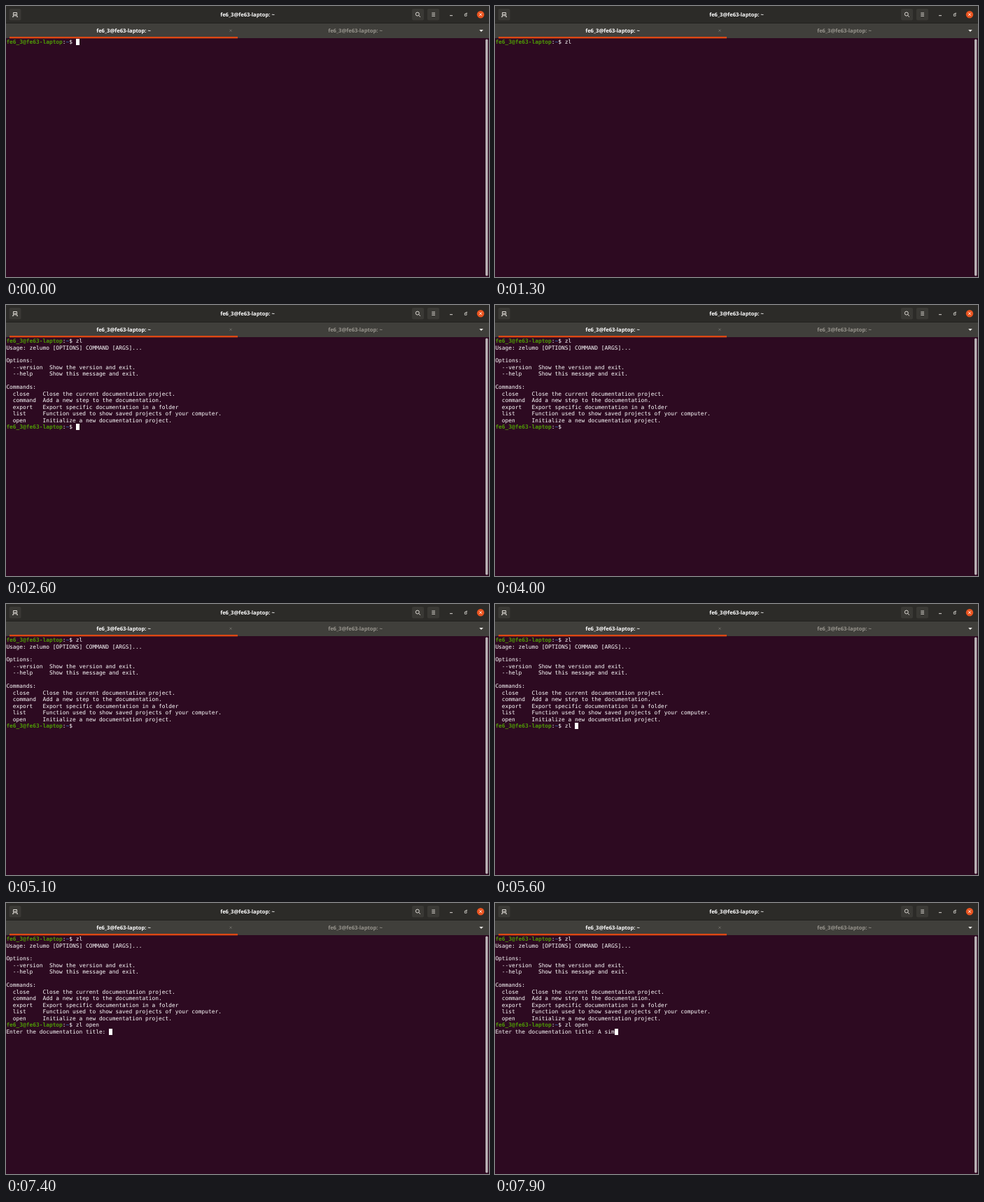
An HTML page that plays this animation: 690 by 388 pixels, repeating every 8 s.

```html
<!DOCTYPE html>
<html lang="en">
<head>
<meta charset="utf-8">
<title>Terminal</title>
<style>
  html, body { margin: 0; width: 100%; height: 100%; overflow: hidden; background: #2d0a21; }
  .stage {
    --w: 4.735px; --h: 9.46px;
    position: relative; width: 690px; height: 388px; overflow: hidden;
    text-rendering: geometricPrecision;
  }
  .chrome { position: absolute; inset: 0; }
  .chrome text { font: 700 7.6px "Noto Sans", "Open Sans", sans-serif; text-anchor: middle; }

  .term {
    position: absolute; left: .4px; top: 47.1px; color: #fff;
    font: 7.866px/9.46px "DejaVu Sans Mono", monospace; white-space: pre;
  }
  .row { position: absolute; left: 0; top: calc(var(--r) * var(--h)); display: flex; }
  b { color: #4e9a06; }
  b + i { color: #fff; font-style: normal; }
  b + i + b { color: #3465a4; }
  .typed { width: calc(var(--n) * var(--w)); overflow: hidden; }
  .cursor {
    position: absolute; background: #fff; width: var(--w); height: 9.3px;
    left: calc(var(--c) * var(--w)); top: calc(var(--r) * var(--h));
    --c: 21; --r: 0; opacity: 1;
  }

  .first, .second, .title, .output, .ask, .cursor { animation: 8s step-end infinite; }
  .first { animation-name: first; }
  .second { animation-name: second; }
  .title { animation-name: title; }
  .output { animation-name: output; }
  .ask { animation-name: ask; }
  .cursor { animation-name: move, blink; }

  /* 1.25% = 100 ms */
  @keyframes first {
    0% { --n: 0 } 8.75% { --n: 1 } 10%, 100% { --n: 2 }
  }
  @keyframes output {
    0% { visibility: hidden } 32.5%, 100% { visibility: visible }
  }
  @keyframes second {
    0% { --n: 0 } 66.25% { --n: 1 } 67.5% { --n: 2 } 70% { --n: 3 }
    71.25% { --n: 4 } 72.5% { --n: 5 } 73.75% { --n: 6 } 75%, 100% { --n: 7 }
  }
  @keyframes ask {
    0% { visibility: hidden } 82.5%, 100% { visibility: visible }
  }
  @keyframes title {
    0% { --n: 0 } 93.75% { --n: 1 } 95% { --n: 2 } 96.25% { --n: 3 }
    97.5% { --n: 4 } 98.75%, 100% { --n: 5 }
  }
  @keyframes move {
    0% { --c: 21; --r: 0 }
    8.75% { --c: 22; --r: 0 }
    10% { --c: 23; --r: 0 }
    21.25% { --c: 24; --r: 0 }
    26.25% { --c: 0; --r: 1 }
    32.5% { --c: 21; --r: 13 }
    66.25% { --c: 22; --r: 13 }
    67.5% { --c: 23; --r: 13 }
    70% { --c: 24; --r: 13 }
    71.25% { --c: 25; --r: 13 }
    72.5% { --c: 26; --r: 13 }
    73.75% { --c: 27; --r: 13 }
    75% { --c: 28; --r: 13 }
    77.5% { --c: 0; --r: 14 }
    82.5% { --c: 31; --r: 14 }
    93.75% { --c: 32; --r: 14 }
    95% { --c: 33; --r: 14 }
    96.25% { --c: 34; --r: 14 }
    97.5% { --c: 35; --r: 14 }
    98.75%, 100% { --c: 36; --r: 14 }
  }
  @keyframes blink {
    0%, 8.75%, 20%, 41.25%, 56.25%, 66.25%, 92.5%, 100% { opacity: 1 }
    3.75%, 16.25%, 33.75%, 48.75%, 63.75%, 85% { opacity: 0 }
  }
</style>
</head>
<body>
<div class="stage">
  <svg class="chrome" width="690" height="388" viewBox="0 0 690 388">
    <rect width="690" height="25" fill="#2c2b28"/>
    <rect y="24" width="690" height="1" fill="#21201d"/>
    <rect y="25" width="690" height="21" fill="#403f3b"/>
    <rect x="5" y="44" width="326" height="2.4" fill="#dd4814"/>

    <g fill="#3a3935">
      <rect x="4.500" y="4" width="17" height="16.500" rx="2"/>
      <rect x="580" y="4" width="17" height="16.500" rx="2"/>
      <rect x="602" y="4" width="17" height="16.500" rx="2"/>
    </g>
    <g fill="none" stroke="#dedbd5" stroke-width="1">
      <path d="M9 15.500H10.500V9.500H15.500V15.500H17M13 11V15M11.200 13H14.800"/>
      <circle cx="587.800" cy="11.600" r="2.500"/>
      <path d="M589.700 13.500L592 15.800"/>
      <path d="M608.300 10H613M608.300 12.200H613M608.300 14.400H613" stroke-width=".9"/>
      <path d="M634 13.700H638"/>
      <path d="M655.300 11.500H658V14.300H655.300ZM656.700 10.300H659.200" stroke-width=".8"/>
    </g>
    <circle cx="678" cy="12.200" r="5.200" fill="#e95420"/>
    <path d="M676.200 10.400L679.800 14M679.800 10.400L676.200 14" stroke="#fff" stroke-width=".9"/>
    <path d="M676.200 34H681.800L678.900 37Z" fill="#eeece8"/>
    <path d="M319.500 33.700L322.500 36.700M322.500 33.700L319.500 36.700" stroke="#77756f" stroke-width=".8"/>

    <text x="345" y="15" fill="#fff">fe6_3@fe63-laptop: ~</text>
    <text x="168" y="38" fill="#fff">fe6_3@fe63-laptop: ~</text>
    <text x="499" y="38" fill="#96938c">fe6_3@fe63-laptop: ~</text>

    <rect x="685" y="47.500" width="3.500" height="339" rx="1.700" fill="#b9b2b5"/>
  </svg>

  <div class="term">
    <div class="cursor"></div>
    <div class="row" style="--r:0"><b>fe6_3@fe63-laptop</b><i>:</i><b>~</b><span>$ </span><span class="typed first">zl</span></div>
    <div class="output">
      <div class="row" style="--r:1">Usage: zelumo [OPTIONS] COMMAND [ARGS]...

Options:
  --version  Show the version and exit.
  --help     Show this message and exit.

Commands:
  close    Close the current documentation project.
  command  Add a new step to the documentation.
  export   Export specific documentation in a folder
  list     Function used to show saved projects of your computer.
  open     Initialize a new documentation project.</div>
      <div class="row" style="--r:13"><b>fe6_3@fe63-laptop</b><i>:</i><b>~</b><span>$ </span><span class="typed second">zl open</span></div>
    </div>
    <div class="row ask" style="--r:14"><span>Enter the documentation title: </span><span class="typed title">A sim</span></div>
  </div>
</div>
</body>
</html>
```
